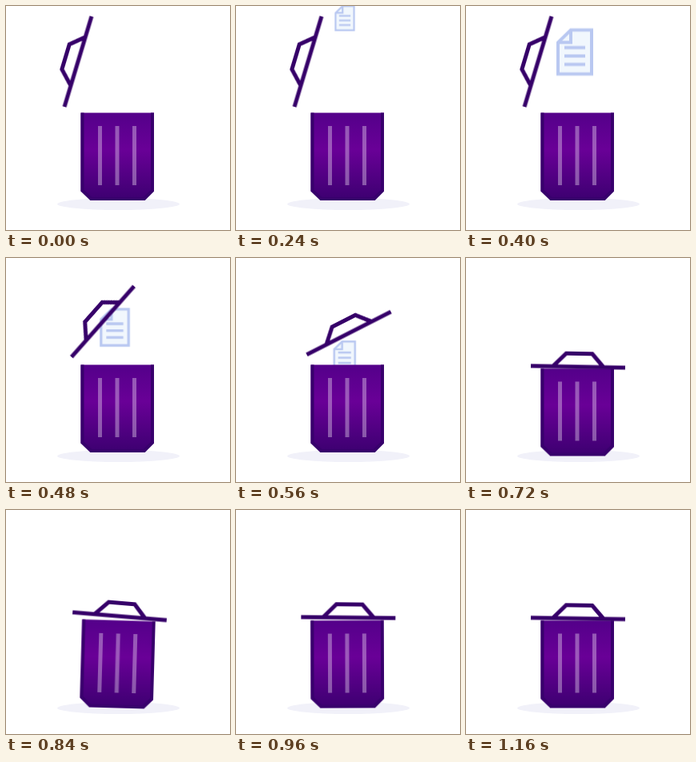
Recreate the animation shown at these times as an HTML page. Size 280 by 280 pixels, loop 1.64 s.

```html
<!DOCTYPE html>
<html lang="en">
<head>
<meta charset="utf-8">
<title>Paper into bin</title>
<style>
  html, body { margin: 0; width: 100%; height: 100%; overflow: hidden; background: #fff; }
  svg { display: block; width: 100vw; height: 100vh; }

  /* Motion is stepped at 25 pictures a second; the small lead keeps steps on their ticks. */
  .paper, .bin, .lid { animation: 1640ms steps(2) -4ms infinite; }
  .paper { animation-name: drop; fill: none; stroke: #b9c8f1; stroke-width: 4; }
  .bin { animation-name: wobble; transform-origin: 140px 197px; }
  .lid { animation-name: shut; fill: none; stroke: #360069; stroke-width: 5; }
  .sheet { fill: #f1f7fd; }
  .ribs { stroke: #fff; stroke-opacity: .35; stroke-width: 5; }
  .rim { fill: none; stroke: #38006c; stroke-width: 4; }

  @keyframes drop {
    0%      { transform: translate(136px, -60px) scale(.32); animation-timing-function: steps(1); }
    9.756%  { transform: translate(136px, 3px) scale(.32); }
    14.634% { transform: translate(136px, 15.2px) scale(.55); }
    19.512% { transform: translate(136px, 33.7px) scale(.78); }
    24.39%  { transform: translate(136px, 57.5px) scale(1); }
    29.268% { transform: translate(136px, 86.7px) scale(.82); }
    34.146% { transform: translate(135.7px, 121.5px) scale(.62); }
    39.024%, 100% { transform: translate(135.7px, 162px) scale(.42); }
  }

  @keyframes wobble {
    0%, 39.024% { transform: translateY(0) rotate(0deg); animation-timing-function: steps(1); }
    41.463% { transform: translateY(1px) rotate(0deg); animation-timing-function: steps(1); }
    43.902% { transform: translateY(4.5px) rotate(0deg); animation-timing-function: steps(3); }
    51.22%  { transform: translateY(4.5px) rotate(1.6deg); animation-timing-function: steps(4); }
    60.976% { transform: translateY(4.5px) rotate(-.8deg); animation-timing-function: steps(4); }
    70.732%, 100% { transform: translateY(4.5px) rotate(0deg); }
  }

  @keyframes shut {
    0%, 24.39% { transform: translate(90px, 69.5px) rotate(-73.3deg); }
    29.268% { transform: translate(121px, 79.5px) rotate(-48.5deg); }
    34.146% { transform: translate(141px, 94px) rotate(-27deg); }
    39.024% { transform: translate(141px, 119px) rotate(-10deg); animation-timing-function: steps(1); }
    41.463% { transform: translate(140.5px, 132px) rotate(-2deg); animation-timing-function: steps(1); }
    43.902% { transform: translate(140px, 136px) rotate(1.1deg); animation-timing-function: steps(3); }
    51.22%  { transform: translate(142px, 132.8px) rotate(4.8deg); animation-timing-function: steps(4); }
    60.976% { transform: translate(139.8px, 135px) rotate(-.8deg); animation-timing-function: steps(4); }
    70.732%, 100% { transform: translate(140px, 135.6px) rotate(.9deg); }
  }
</style>
</head>
<body>
<svg viewBox="0 0 280 280">
  <defs>
    <linearGradient id="shade" x2="0" y2="1">
      <stop offset="0" stop-color="#54008a"/>
      <stop offset=".42" stop-color="#690097"/>
      <stop offset="1" stop-color="#3c0070"/>
    </linearGradient>
  </defs>

  <ellipse cx="140.5" cy="247.5" rx="76.5" ry="7.5" fill="#f1f1f9"/>

  <g class="paper">
    <path class="sheet" d="M-5-27.5H21V27.5H-21V-12Z"/>
    <path d="M-5-27.5V-12H-21M-13-5.5H13M-13 5H13M-13 15.5H13"/>
  </g>

  <g class="bin">
    <path fill="url(#shade)" d="M93.5 133.5H185V231.5L173.5 243H105.5L93.5 231.5Z"/>
    <path class="rim" d="M95.5 133.5V230.7L106.3 241H172.7L183 230.7V133.5"/>
    <path class="ribs" d="M117.5 150V224M139 150V224M160.5 150V224"/>
  </g>

  <g class="lid">
    <path d="M-59 0H59M-31.5 0L-15 -16.4H17.6L32 0"/>
  </g>
</svg>
</body>
</html>
```
